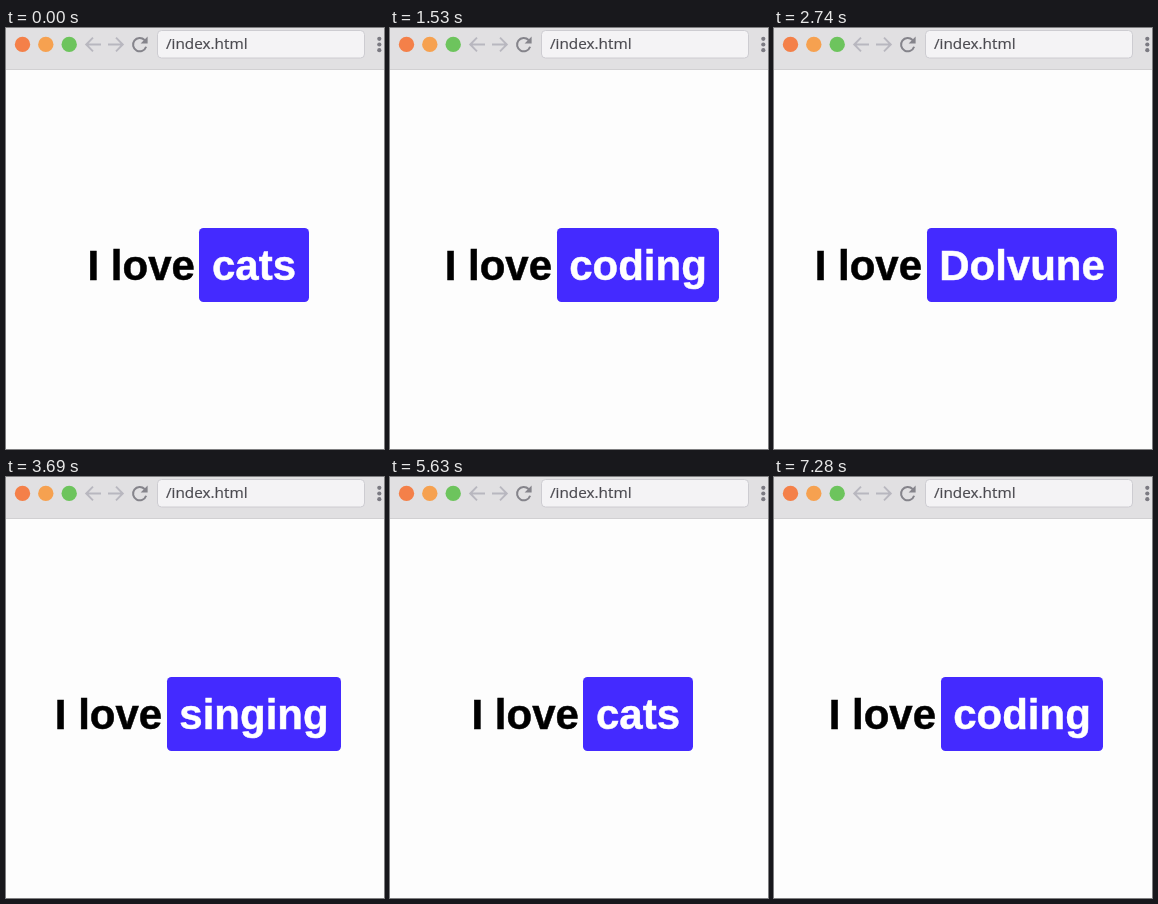
An HTML page for the animation above (7.35 s loop, 378 by 421 pixels).

```html
<!DOCTYPE html>
<html lang="en">
<head>
<meta charset="utf-8">
<title>I love</title>
<style>
  html, body { margin: 0; width: 100%; height: 100%; overflow: hidden; background: #fdfdfd; }
  .bar { position: absolute; left: 0; top: 0; width: 100%; height: 43px; display: block; }
  .url {
    font: 15.3px "Open Sans", "Noto Sans", sans-serif;
    fill: #4b4a50; stroke: #4b4a50; stroke-width: .2px;
  }
  .line {
    position: absolute; left: 6px; right: 0; top: 200px; height: 74px;
    display: flex; justify-content: center;
    font: bold 42px/76px "Liberation Sans", Arial, sans-serif;
    font-kerning: none; white-space: pre; color: #000;
    -webkit-text-stroke: .5px currentColor;
  }
  .lead { height: 74px; margin-right: 4.6px; }
  .word { height: 74px; padding: 0 12.5px; border-radius: 4.5px; background: #442aff; color: #fff; }
</style>
</head>
<body>
<svg class="bar" viewBox="0 0 378 43">
  <rect width="378" height="42" fill="#e1e0e2"/>
  <rect y="41" width="378" height="1" fill="#d1d0d2"/>
  <circle cx="16.5" cy="16.4" r="7.7" fill="#f48049"/>
  <circle cx="39.8" cy="16.4" r="7.7" fill="#f6a150"/>
  <circle cx="63.2" cy="16.4" r="7.7" fill="#6dc45d"/>
  <g fill="none" stroke="#b8b7bf" stroke-width="1.9">
    <path d="M95 16.5H80.5M87 9.7L80.2 16.5L87 23.3"/>
    <path d="M102 16.5H116.5M110 9.7L116.8 16.5L110 23.3"/>
  </g>
  <path d="M138.6 12A6.7 6.7 0 1 0 140.1 18.7" fill="none" stroke="#85848b" stroke-width="2"/>
  <path d="M141.6 8.6V15.6H134.6Z" fill="#85848b"/>
  <rect x="151.5" y="2.5" width="207" height="27.5" rx="4" fill="#f4f3f5" stroke="#cdccd1"/>
  <text class="url" x="160" y="21.3">/index.html</text>
  <g fill="#7b7a82">
    <circle cx="373.3" cy="10.8" r="2.1"/>
    <circle cx="373.3" cy="16.5" r="2.1"/>
    <circle cx="373.3" cy="22.2" r="2.1"/>
  </g>
</svg>
<div class="line"><span class="lead">I love</span><span class="word" id="word">cats</span></div>
<script>
  const LOOP = 7350;
  const steps = [
    [0, "cats"],
    [200, "coding"],
    [1720, "Dolvune"],
    [3200, "singing"],
    [4690, "cats"],
    [6200, "coding"],
  ];
  const word = document.getElementById("word");
  const start = performance.now();

  function draw(now) {
    const t = Math.max(0, now - start) % LOOP;
    const text = steps.filter(([at]) => at <= t).pop()[1];
    if (word.textContent !== text) word.textContent = text;
    requestAnimationFrame(draw);
  }
  requestAnimationFrame(draw);
</script>
</body>
</html>
```
